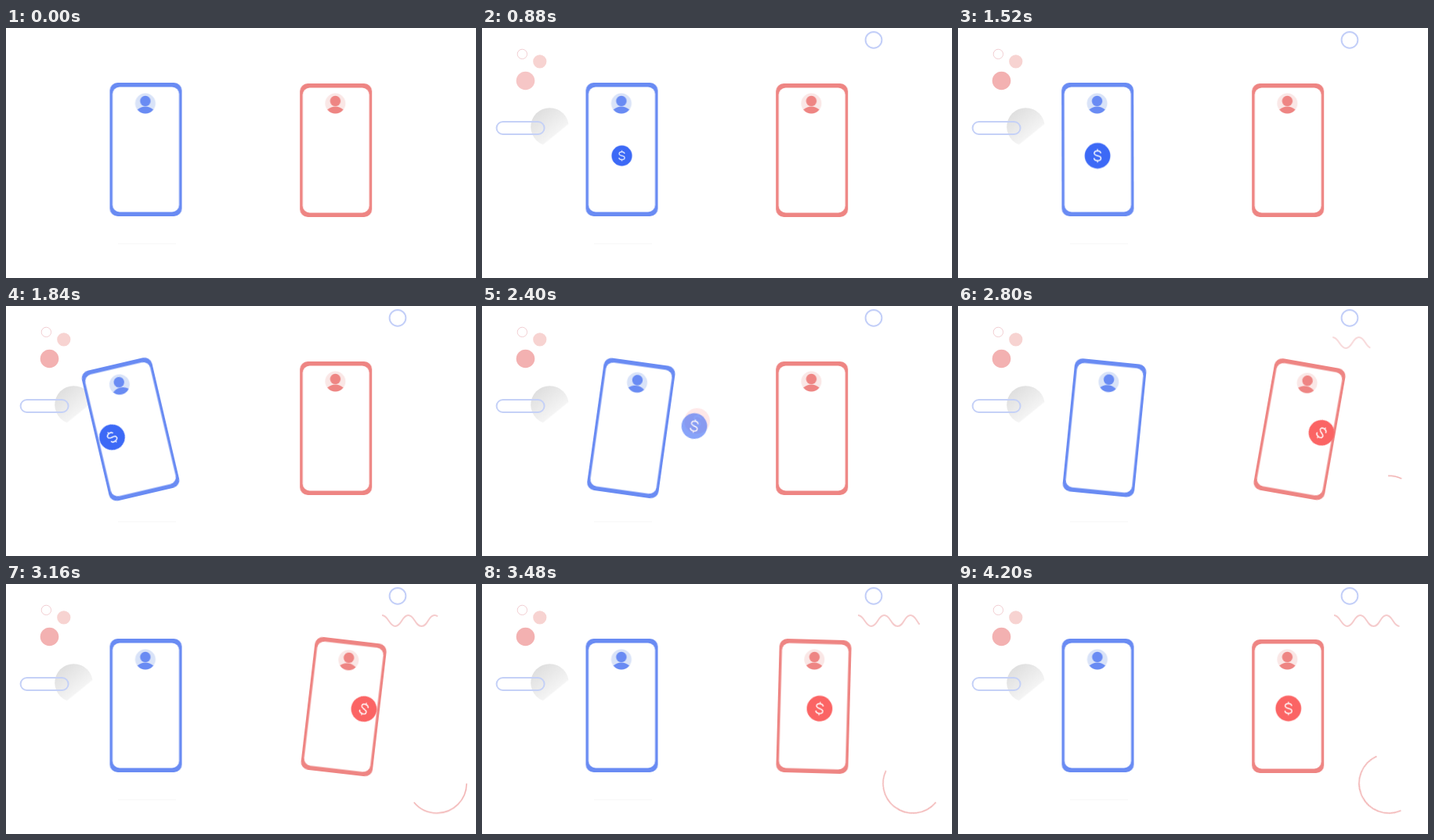
These frames come from a looping animation (600x320 px, 5 s). An HTML page:

```html
<!DOCTYPE html>
<html lang="en">
<head>
<meta charset="utf-8">
<title>Phone to phone payment</title>
<style>
html, body { margin: 0; width: 100%; height: 100%; overflow: hidden; background: #fff; }
svg { display: block; width: 600px; height: 320px; }
.anim { animation: 5s linear infinite; }

.blue { color: #698bf3; }
.red { color: #ee8583; }
.line { fill: none; stroke-width: 2; }

/* background shapes */
.pill { animation-name: draw; stroke: #c5d1f7; }
.ring { animation-name: draw; stroke: #c3cff8; }
.hoop { animation-name: draw; stroke: #f1cdd1; stroke-width: 1; }
.fade { animation-name: fade; }
.late { animation-name: late; }
.wave { animation-name: wave; stroke: #f5cbcc; }
.arc { animation-name: arc; stroke: #f2b3b3; stroke-width: 1.6; }

@keyframes draw {
  0%, 4% { stroke-dasharray: 0 2; animation-timing-function: cubic-bezier(.4, 0, .3, 1); }
  17.6%, 100% { stroke-dasharray: 1 2; }
}
@keyframes fade {
  0%, 4% { opacity: 0; }
  14.4%, 100% { opacity: 1; }
}
@keyframes late {
  0%, 8% { opacity: 0; }
  17.6% { opacity: .72; }
  24%, 100% { opacity: 1; }
}
@keyframes wave {
  0%, 54% { stroke-dasharray: 0 2; opacity: .4; transform: translateX(-2.5px); }
  54.4% { stroke-dasharray: .1 2; }
  56% { stroke-dasharray: .58 2; opacity: .75; transform: translateX(-1.8px); animation-timing-function: ease-out; }
  63.2% { stroke-dasharray: .84 2; opacity: 1; transform: none; }
  65.6% { stroke-dasharray: .9 2; animation-timing-function: ease-out; }
  76.8%, 100% { stroke-dasharray: 1 2; opacity: 1; transform: none; }
}
@keyframes arc {
  0%, 54% { stroke-dasharray: 0 720; transform: rotate(100deg); }
  54.4% { stroke-dasharray: 9 720; transform: rotate(108deg); }
  56% { stroke-dasharray: 26 720; transform: rotate(268deg); animation-timing-function: cubic-bezier(.2, .5, .6, .9); }
  63.2% { stroke-dasharray: 140 720; transform: rotate(360deg); }
  65.6% { stroke-dasharray: 155 720; transform: rotate(376deg); animation-timing-function: cubic-bezier(.3, .5, .6, .9); }
  76.8% { stroke-dasharray: 176 720; transform: rotate(420deg); animation-timing-function: ease-out; }
  84%, 100% { stroke-dasharray: 180 720; transform: rotate(426deg); }
}

/* phones tilt about the middle of their lower edge */
.throw { animation-name: throw; }
.catch { animation-name: catch; }

@keyframes throw {
  0%, 30% { transform: rotate(0); animation-timing-function: cubic-bezier(.4, 0, .4, 1); }
  36.8% { transform: rotate(-13.2deg); animation-timing-function: ease-out; }
  40%, 43.6% { transform: rotate(-13.5deg); animation-timing-function: cubic-bezier(.4, 0, .5, 1); }
  48% { transform: rotate(8deg); animation-timing-function: ease-out; }
  50%, 53% { transform: rotate(8.4deg); animation-timing-function: cubic-bezier(.4, 0, .3, 1); }
  62.8%, 100% { transform: rotate(0); }
}
@keyframes catch {
  0%, 51.2% { transform: rotate(0); animation-timing-function: ease-out; }
  55.2% { transform: rotate(10.2deg); }
  56% { transform: rotate(10deg); animation-timing-function: cubic-bezier(.4, .2, .7, .8); }
  63.2% { transform: rotate(6.7deg); animation-timing-function: cubic-bezier(.3, .3, .4, 1); }
  76%, 100% { transform: rotate(0); }
}

/* the coin changes colour in flight */
.sent { animation-name: sent; color: #3c69f6; }
.got { animation-name: got; color: #fb6464; }

@keyframes sent {
  0%, 13.4% { transform: translate(178.5px, 163.5px) rotate(0) scale(0); opacity: 1; }
  14.4% { transform: translate(178.5px, 163.5px) rotate(0) scale(.27); }
  17.6% { transform: translate(178.5px, 163.5px) rotate(0) scale(.8); animation-timing-function: ease-out; }
  24%, 30% { transform: translate(178.5px, 163.5px) rotate(0) scale(1); animation-timing-function: cubic-bezier(.4, 0, .4, 1); }
  36.8% { transform: translate(135.5px, 168px) rotate(-42deg) scale(1); animation-timing-function: ease-out; }
  40%, 43.6% { transform: translate(135px, 168.2px) rotate(-44deg) scale(1); animation-timing-function: cubic-bezier(.4, 0, .8, .8); }
  46.8% { opacity: 1; }
  48% { transform: translate(270.5px, 154px) rotate(10deg) scale(1); opacity: .62; }
  49.6%, 100% { transform: translate(315px, 134px) rotate(18deg) scale(1); opacity: 0; }
}
@keyframes got {
  0%, 47.2% { transform: translate(250px, 151px) rotate(5deg); opacity: 0; }
  48% { transform: translate(274px, 147.5px) rotate(10deg); opacity: .14; }
  49.6% { transform: translate(320px, 130px) rotate(18deg); opacity: 1; }
  51.2% { transform: translate(385px, 130px) rotate(26deg); }
  52.8% { transform: translate(438px, 154px) rotate(34deg); animation-timing-function: ease-out; }
  55.2% { transform: translate(464.5px, 162.5px) rotate(41deg); }
  56% { transform: translate(464px, 162.3px) rotate(40deg); animation-timing-function: cubic-bezier(.4, .2, .7, .8); }
  63.2% { transform: translate(457px, 160px) rotate(23deg); animation-timing-function: cubic-bezier(.3, .2, .4, 1); }
  76%, 100% { transform: translate(421.8px, 159.3px) rotate(0); opacity: 1; }
}
</style>
</head>
<body>
<svg viewBox="0 0 600 320">
  <defs>
    <g id="phone">
      <rect x="-46" y="-171" width="92" height="171" rx="10" fill="currentColor"/>
      <rect x="-42.5" y="-165.5" width="85" height="160" rx="9" fill="#fff"/>
    </g>
    <g id="person" fill="currentColor">
      <circle cy="-3.2" r="6.7"/>
      <path d="M-10.2 8Q0 0 10.2 8A13 13 0 0 1 -10.2 8Z"/>
    </g>
    <g id="coin">
      <circle r="16.4" fill="currentColor"/>
      <path d="M4.3 -3.1C4.1 -5.2 2.5 -6.3 0 -6.3C-2.6 -6.3 -4.2 -5 -4.2 -3.2C-4.2 -1.2 -2.6 -.6 0 0C2.8 .6 4.4 1.3 4.4 3.2C4.4 5.1 2.7 6.3 0 6.3C-2.7 6.3 -4.4 5.1 -4.5 2.9M0 -8.6V-6.3M0 6.3V8.6"
        fill="none" stroke="#fff" stroke-width="1.4"/>
    </g>
    <linearGradient id="grey" gradientUnits="userSpaceOnUse" x1="71" y1="107.8" x2="94.6" y2="136.9">
      <stop offset="0" stop-color="#dfdfdf"/>
      <stop offset=".95" stop-color="#f4f4f4"/>
      <stop offset="1" stop-color="#fff"/>
    </linearGradient>
  </defs>

  <path d="M143 276H217" stroke="#f6f6f6"/>

  <circle class="anim fade" cx="86.5" cy="126.5" r="24.3" fill="url(#grey)"/>
  <rect class="anim line pill" x="18.6" y="120" width="61" height="16" rx="8" pathLength="1"/>
  <path class="anim line ring" d="M500 4.9A10.4 10.4 0 0 0 500 25.7A10.4 10.4 0 0 0 500 4.9" pathLength="1"/>
  <circle class="anim line hoop" cx="51.4" cy="33.4" r="6.2" pathLength="1"/>
  <circle class="anim fade" cx="73.8" cy="42.9" r="8.6" fill="#f7d3d1"/>
  <circle class="anim late" cx="55.5" cy="67.5" r="11.8" fill="#f3b1b1"/>
  <path class="anim line wave" pathLength="1"
    d="M480 40C488 40 489 54 497 54S505.500 40 513.500 40S522 54 530.500 54S539 40 547 40S555.500 54 563.500 54"/>
  <g transform="translate(550 255.300)">
    <circle class="anim line arc" r="38" pathLength="360"/>
  </g>

  <g transform="translate(178.5 241)">
    <g class="anim throw blue">
      <use href="#phone"/>
      <g transform="translate(-.6 -144.4)">
        <circle r="13" fill="#d9e3f8"/>
        <use href="#person"/>
      </g>
    </g>
  </g>
  <g transform="translate(421.2 242)">
    <g class="anim catch red">
      <use href="#phone"/>
      <g transform="translate(-.8 -145.4)">
        <circle r="13" fill="#fae7e6"/>
        <use href="#person"/>
      </g>
    </g>
  </g>

  <g class="anim got"><use href="#coin"/></g>
  <g class="anim sent"><use href="#coin"/></g>
</svg>
</body>
</html>
```
